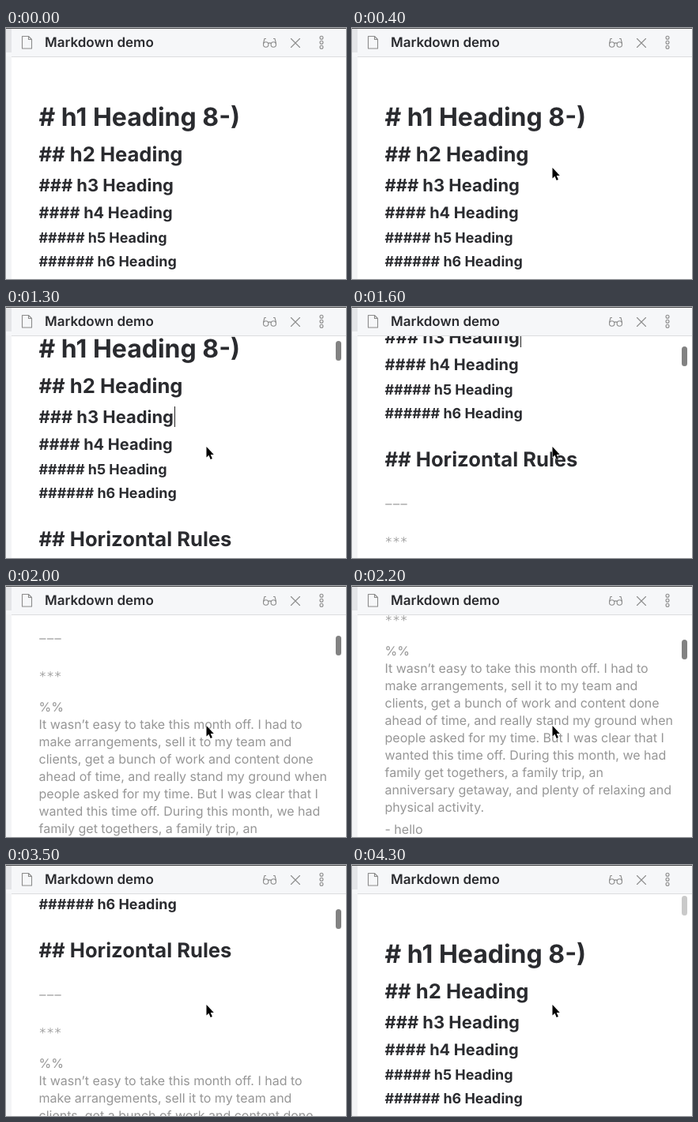
Recreate the animation shown at these times as an HTML page. Size 430 by 318 pixels, loop 4.4 s.

```html
<!DOCTYPE html>
<html lang="en">
<head>
<meta charset="utf-8">
<title>Markdown demo</title>
<style>
  html, body { margin: 0; width: 100%; height: 100%; overflow: hidden; background: #fff; }
  svg { display: block; width: 430px; height: 318px; }
  text { font-family: Inter, sans-serif; text-rendering: geometricPrecision; white-space: pre; }
  .head { font-weight: 700; fill: #2a2b2f; }
  .note { font-size: 16px; fill: #969696; }
  .rule { font: 16px "DejaVu Sans Mono", monospace; fill: #a2a2a2; }
  .icons { fill: none; stroke: #8c8c8c; stroke-width: 1.1; stroke-linejoin: round; stroke-linecap: round; }
</style>
</head>
<body>
<svg viewBox="0 0 430 318">
  <clipPath id="view"><rect x="7" y="37" width="423" height="281"/></clipPath>
  <rect width="430" height="318" fill="#fff"/>

  <g clip-path="url(#view)">
    <g id="page">
      <rect id="caret" x="213" y="186" width="1" height="26" fill="#222"/>
    </g>
  </g>
  <rect id="thumb" x="417" width="7" height="25" rx="3.5"/>

  <rect width="7" height="318" fill="#f3f4f6"/>
  <rect width="430" height="36" fill="#f6f7f9"/>
  <rect width="7" height="31" fill="#e4e5e8"/>
  <rect x="7" y="36" width="423" height="1" fill="#dcdddf"/>
  <rect width="430" height="1" fill="#4c4c4e"/>
  <text x="49" y="24" font-size="17" font-weight="600" fill="#2a2b2f">Markdown demo</text>

  <g class="icons">
    <path d="M20.5 10.5h8l4 4v11.5h-12zM28.5 10.5v4h4"/>
    <path d="M325.5 19.5l1.5-6h1.5M341.5 19.5l-1.5-6h-1.5M331.5 19.5q2-1.2 4 0"/>
    <circle cx="328.7" cy="21" r="3.2"/>
    <circle cx="338.3" cy="21" r="3.2"/>
    <path d="M360.5 13.5l11 11m0-11l-11 11"/>
    <circle cx="399" cy="12.2" r="2"/>
    <circle cx="399" cy="18.2" r="2"/>
    <circle cx="399" cy="24.2" r="2"/>
  </g>

  <path id="mouse" d="M.5 0V13.6L3.5 10.8 5.7 16 7.9 15.1 5.7 10H9.8Z"
        fill="#000" stroke="#fff" stroke-width="1" paint-order="stroke"/>
</svg>
<script>
const LOOP = 4400, STEP = 100;
const $ = id => document.getElementById(id);
const page = $('page'), caret = $('caret'), thumb = $('thumb'), mouse = $('mouse');

function addText(kind, y, text, size) {
  const el = document.createElementNS('http://www.w3.org/2000/svg', 'text');
  el.setAttribute('class', kind);
  el.setAttribute('x', 41.5);
  el.setAttribute('y', y);
  if (size) el.setAttribute('font-size', size);
  el.textContent = text;
  page.insertBefore(el, caret);
}

[
  [124, '# h1 Heading 8-)', 32],
  [169, '## h2 Heading', 25.6],
  [207, '### h3 Heading', 21.92],
  [241, '#### h4 Heading', 20],
  [272, '##### h5 Heading', 17.92],
  [302, '###### h6 Heading', 17.92],
  [363, '## Horizontal Rules', 25.6]
].forEach(([y, text, size]) => addText('head', y, text, size));

addText('rule', 415.5, '\u2212\u2212\u2212');
addText('rule', 464, '***');

[
  '%%',
  'It wasn’t easy to take this month off. I had to',
  'make arrangements, sell it to my team and',
  'clients, get a bunch of work and content done',
  'ahead of time, and really stand my ground when',
  'people asked for my time. But I was clear that I',
  'wanted this time off. During this month, we had',
  'family get togethers, a family trip, an',
  'anniversary getaway, and plenty of relaxing and',
  'physical activity.'
].forEach((text, i) => addText('note', 503 + 22 * i, text));
addText('note', 728.5, '- hello');
addText('note', 750, '%%');

// Scroll offsets per step, from the first step of each gesture
const down = [6, 24, 60, 102, 132, 161, 207, 257, 304, 344, 384, 415, 429];
const up = [385, 246, 90, 0];
const entry = [[218, 253], [233, 218], [247, 189], [253, 177]];
const at = (list, i) => list[Math.min(i, list.length - 1)];

function scrollAt(n) {
  if (n < 11) return 0;
  return n < 34 ? at(down, n - 11) : at(up, n - 34);
}

function thumbColor(n) {
  if (n < 11 || (n >= 30 && n < 34)) return 'none';
  return n === 29 || n === 43 ? '#cacaca' : '#828282';
}

function draw(now) {
  const n = Math.floor(now % LOOP / STEP);
  const scroll = scrollAt(n);
  page.setAttribute('transform', `translate(0 ${-scroll})`);
  caret.setAttribute('visibility', n >= 11 && n < 41 ? 'visible' : 'hidden');
  thumb.setAttribute('y', Math.round(39 + scroll * 0.07));
  thumb.setAttribute('fill', thumbColor(n));
  mouse.setAttribute('visibility', n ? 'visible' : 'hidden');
  mouse.setAttribute('transform', `translate(${at(entry, Math.max(n - 1, 0))})`);
}

const start = performance.now();
function tick() {
  draw(performance.now() - start);
  requestAnimationFrame(tick);
}
tick();
</script>
</body>
</html>
```
